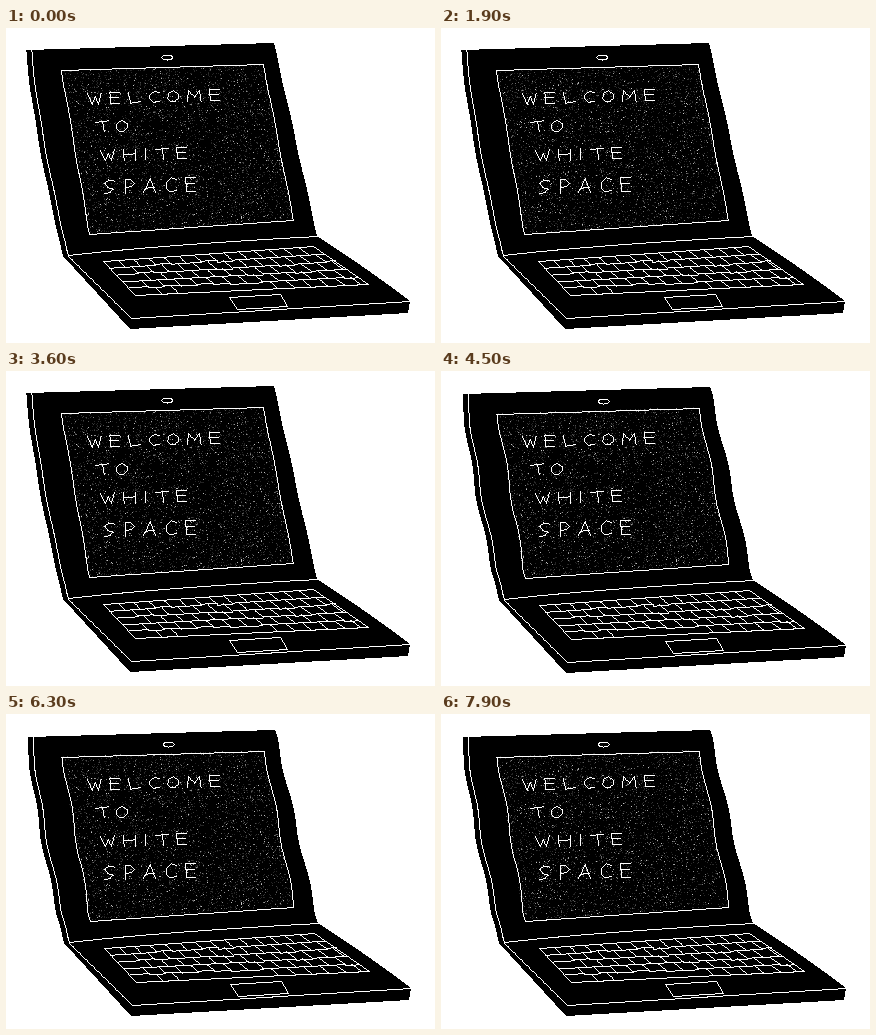
An HTML page with a canvas that plays this animation: 429 by 315 pixels, repeating every 8000 ms.

```html
<!DOCTYPE html>
<html lang="en">
<head>
<meta charset="utf-8">
<title>Laptop</title>
<style>
html, body { margin: 0; width: 100%; height: 100%; overflow: hidden; background: #fff; }
canvas { display: block; width: 429px; height: 315px; image-rendering: pixelated; }
</style>
</head>
<body>
<canvas id="stage" width="429" height="315" role="img" aria-label="Welcome to white space"></canvas>
<script>
const ctx = document.getElementById('stage').getContext('2d');
const STEP = 100, STEPS = 80, HOLD = 9;

const mix = (p, q, t) => p.map((v, i) => v + (q[i] - v) * t);
const move = (list, dx, dy) => list.map(([x, y]) => [x + dx, y + dy]);

function random(seed) {
  return () => {
    seed = (seed + 0x6D2B79F5) | 0;
    let t = Math.imul(seed ^ (seed >>> 15), seed | 1);
    t ^= t + Math.imul(t ^ (t >>> 7), t | 61);
    return ((t ^ (t >>> 14)) >>> 0) / 4294967296;
  };
}

// Quadratic curve that passes through b halfway.
function curve(a, b, c) {
  const ctrl = b.map((v, i) => 2 * v - (a[i] + c[i]) / 2);
  return Array.from({ length: 25 }, (_, i) => {
    const t = i / 24;
    return mix(mix(a, ctrl, t), mix(ctrl, c, t), t);
  });
}

const bow = (a, c) => curve(a, mix(a, c, 0.5), c);

// Corners of the laptop.
const top0 = [20, 22], top1 = [268, 15], hinge0 = [57, 228], hinge1 = [311, 208];
const front0 = [125, 290], front1 = [404, 273];
const lidEdge = curve(top0, [33, 115], hinge0);
const laptop = {
  body: [
    ...lidEdge.slice().reverse(),
    ...bow(top0, top1), ...bow(top1, hinge1), ...curve(hinge1, [360, 241], front1),
    [402, 285], [124, 301]
  ],
  lines: [
    move(lidEdge, 5, 0),
    curve([62, 227], [170, 217], hinge1),
    bow([62, 228], front0),
    bow(front0, front1)
  ],
  screen: [[55, 42], [257, 36], [287, 192], [83, 206], [55, 42]]
    .flatMap((p, i, all) => i ? bow(all[i - 1], p) : []),
  pad: [[223, 269], [274, 266], [281, 278], [231, 281], [223, 269]],
  keys: [[97, 233], [307, 218], [362, 256], [129, 267]],
  camera: Array.from({ length: 17 }, (_, i) => {
    const t = i * Math.PI / 8;
    return [160.5 + 5.5 * Math.cos(t), 29 + 2.5 * Math.sin(t)];
  })
};

// The second drawing sits one pixel off and its lid is wavier.
const redraw = side => list => list.map(([x, y]) => {
  const wave = y > 20 && y < 205 ? Math.cos((y - 92) * Math.PI / 37) : 0;
  return [x + side + (side ? 1.2 : 0.4) * wave, y + side];
});

// Letter strokes: x and y digits on a 0-9 grid.
const widths = { W: 14, E: 10, L: 12, C: 11, O: 11, M: 14, T: 13, H: 12, I: 3, S: 10, P: 10, A: 12 };
const glyphs = {
  W: '00 39 53 79 90', E: '90 00 19 99|04 84', L: '00 29 98', C: '91 50 13 16 49 98',
  O: '50 12 06 39 69 96 93 50', M: '09 10 56 80 99', T: '01 90|50 69', H: '00 19|90 99|14 94',
  I: '50 59', S: '91 40 02 35 86 58 09', P: '19 10 60 93 65 15', A: '09 50 99|26 86'
};

function write(text, x, y, gap, height) {
  for (const ch of text) {
    for (const stroke of glyphs[ch].split('|')) {
      path(stroke.split(' ').map(([u, v]) => {
        const px = x + u / 9 * widths[ch];
        return [px, y + v / 9 * height - (px - 80) * 0.03];
      }));
    }
    x += widths[ch] + gap;
  }
}

// Crisp one-pixel line without smoothing.
function line(a, b) {
  const n = Math.max(1, Math.ceil(Math.abs(b[0] - a[0])), Math.ceil(Math.abs(b[1] - a[1])));
  for (let i = 0; i <= n; i++) {
    const [x, y] = mix(a, b, i / n);
    ctx.fillRect(Math.round(x), Math.round(y), 1, 1);
  }
}

function path(list) {
  for (let i = 1; i < list.length; i++) line(list[i - 1], list[i]);
}

// Calls span(left, right, y) for each row inside the polygon.
function scan(poly, span) {
  for (let y = 0; y < 315; y++) {
    const xs = [], m = y + 0.5;
    poly.forEach((a, i) => {
      const b = poly[(i + 1) % poly.length];
      if ((a[1] <= m) !== (b[1] <= m)) xs.push(a[0] + (b[0] - a[0]) * (m - a[1]) / (b[1] - a[1]));
    });
    xs.sort((a, b) => a - b);
    for (let i = 0; i + 1 < xs.length; i += 2) span(Math.round(xs[i]), Math.round(xs[i + 1]), y);
  }
}

// Mostly dim specks with a few bright ones.
function drawStatic(seed) {
  const rnd = random(seed * 977 + 5);
  scan(laptop.screen, (l, r, y) => {
    for (let x = l; x < r; x++) {
      if (rnd() > 0.12) continue;
      const v = Math.round(35 + 170 * rnd() ** 5);
      ctx.fillStyle = `rgb(${v},${v},${v})`;
      ctx.fillRect(x, y, 1, 1);
    }
  });
}

function drawKeys([a, b, c, d]) {
  const rnd = random(31), rows = 5;
  const at = (u, v) => mix(mix(a, b, u), mix(d, c, u), v);
  path([a, b, c, d, a]);
  for (let r = 0; r < rows; r++) {
    const top = r / rows, low = (r + 1) / rows, last = r === rows - 1;
    let from = 0;
    for (let k = 1; k <= 14; k++) {
      const u = Math.min(1, (k + r * 0.4 % 1) / 14);
      const space = last && u > 0.25 && u < 0.55;
      if (!space) line(at(u, top), at(u, low));
      const jog = last ? 0 : Math.round(rnd() * 1.4 - 0.7);
      path(move([at(from, low), at(u, low)], 0, jog));
      from = u;
    }
  }
}

function draw(step) {
  const side = Math.floor((step + 3) / HOLD) % 2;
  const pose = redraw(side);
  ctx.fillStyle = '#fff';
  ctx.fillRect(0, 0, 429, 315);
  ctx.fillStyle = '#000';
  scan(pose(laptop.body), (l, r, y) => ctx.fillRect(l, y, r - l, 1));
  drawStatic(step % 3);
  ctx.fillStyle = '#fff';
  [...laptop.lines, laptop.screen, laptop.camera].forEach(list => path(pose(list)));
  path(move(laptop.pad, side, side));
  drawKeys(move(laptop.keys, side, side));
  write('WELCOME', 81, 65, 8.3, 11);
  write('TO', 89, 93, 7.5, 11);
  write('WHITE', 94, 122, 8.5, 11);
  write('SPACE', 98, 152, 9.5, 14);
}

let shown = -1;
const start = performance.now();
function tick() {
  const step = Math.floor((performance.now() - start) / STEP) % STEPS;
  if (step !== shown) draw(shown = step);
  requestAnimationFrame(tick);
}
tick();
</script>
</body>
</html>
```
